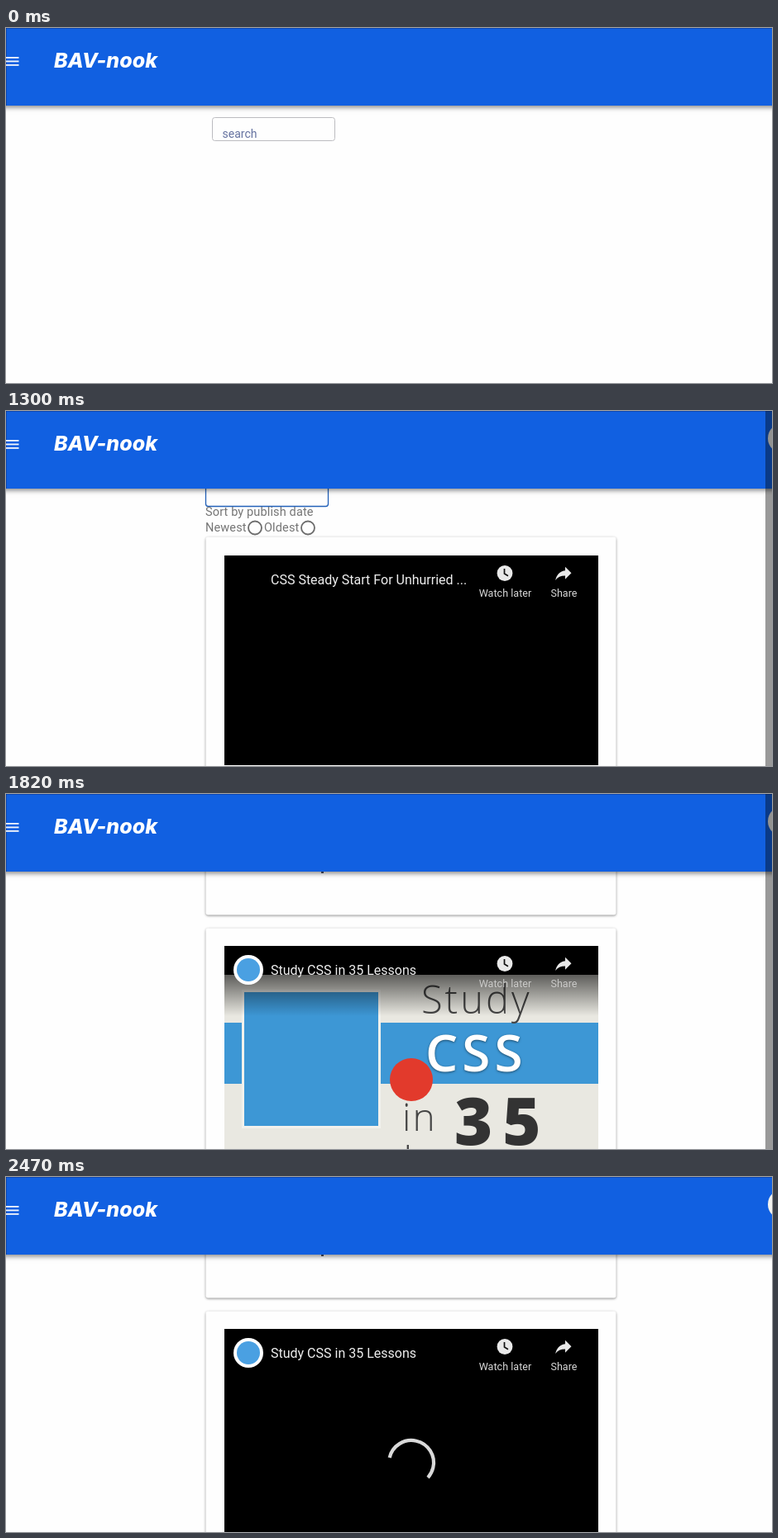
An HTML page with a canvas that plays this animation: 926x430 px, repeating every 2.6 s.

```html
<!DOCTYPE html>
<html lang="en">
<head>
<meta charset="utf-8">
<title>Video list</title>
<style>
  html, body { margin: 0; width: 100%; height: 100%; overflow: hidden; background: #fefefe; }
  canvas { display: block; }
</style>
</head>
<body>
<canvas id="stage" width="926" height="430"></canvas>
<script>
const ctx = document.getElementById('stage').getContext('2d');
const LOOP = 2600, STEP = 130;
const PAGE = '#fefefe', BLUE = '#1160e1', SKY = '#3d97d5';
const SHARE = new Path2D('M14 9V5l7 7-7 7v-4.1c-5 0-8.5 1.6-11 5.1 1-5 4-10 11-11z');

function rect(x, y, w, h, fill) {
  ctx.fillStyle = fill;
  ctx.fillRect(x, y, w, h);
}

function disc(x, y, r, fill) {
  ctx.fillStyle = fill;
  ctx.beginPath();
  ctx.arc(x, y, r, 0, 7);
  ctx.fill();
}

function ring(x, y, r, color, width, from = 0, to = Math.PI * 2) {
  ctx.strokeStyle = color;
  ctx.lineWidth = width;
  ctx.beginPath();
  ctx.arc(x, y, r, from, to);
  ctx.stroke();
}

function text(str, x, y, font, fill, spacing = 0, align = 'left') {
  ctx.font = font;
  ctx.letterSpacing = spacing + 'px';
  ctx.textAlign = align;
  ctx.fillStyle = fill;
  ctx.fillText(str, x, y);
}

const roboto = (size, weight = 400) => `${weight} ${size}px Roboto, sans-serif`;
const openSans = (size, weight) => `${weight} ${size}px "Open Sans", sans-serif`;
const mix = (a, b, p) => a + (b - a) * p;

function shadow(color, blur, dy) {
  ctx.shadowColor = color;
  ctx.shadowBlur = blur;
  ctx.shadowOffsetY = dy;
}

// focus: 0 = label inside the box, 1 = label on the border
function searchField(x, focus) {
  ctx.beginPath();
  ctx.roundRect(x + .5, 108.5, 148, 28, 3);
  ctx.strokeStyle = focus ? '#2260b8' : '#bcbcc0';
  ctx.lineWidth = focus ? 1.3 : 1;
  ctx.stroke();
  if (focus) rect(x + 9, 107, 42 * focus, 3, PAGE);
  text('search', x + 12.5, mix(132.5, 111, focus), roboto(mix(14, 11, focus)),
    focus ? '#2f57a8' : '#6572a0');
}

function sortOptions() {
  const label = (str, x, y) => text(str, x, y, roboto(14.5), '#757575', .136);
  label('Sort by publish date', 241, 148);
  label('Newest', 241, 167);
  label('Oldest', 312, 167);
  for (const x of [301, 365]) ring(x, 162.5, 8, '#6c6c6c', 1.8);
}

function card(y, height) {
  ctx.save();
  shadow('rgba(0,0,0,.45)', 3, 1);
  ctx.beginPath();
  ctx.roundRect(241.5, y, 496, height, 3);
  ctx.fillStyle = PAGE;
  ctx.fill();
  ctx.restore();
}

function thumbnail(y) {
  rect(264, y + 35, 452, 219, '#e9e8e1');
  rect(264, y + 93, 452, 74, SKY);
  rect(285, y + 53, 168, 168, '#f2f1ec');
  rect(288, y + 56, 162, 162, SKY);
  text('Study', 502, y + 82, openSans(47, 300), '#444', 3);
  ctx.save();
  shadow('rgba(0,0,0,.5)', 3, 1);
  text('CSS', 507, y + 152, openSans(62, 600), '#fff', 5);
  ctx.restore();
  text('in', 479, y + 224, openSans(46, 300), '#444', 2);
  text('35', 542, y + 241, openSans(79, 800), '#333', 12);
  text('Lessons', 480, y + 274, openSans(46, 300), '#444', 2);
  const fade = ctx.createLinearGradient(0, y + 35, 0, y + 85);
  fade.addColorStop(0, 'rgba(0,0,0,.6)');
  fade.addColorStop(1, 'rgba(0,0,0,0)');
  rect(264, y + 35, 452, 50, fade);
}

function player(y, title, { channel, thumb, spin }) {
  rect(264, y, 452, 254, '#000');
  if (thumb) thumbnail(y);
  if (channel) {
    disc(293, y + 29, 18, '#fff');
    disc(293, y + 29, 14, '#4aa0e2');
  }
  text(title, 320, y + 35, roboto(16), '#eee');

  disc(603, y + 21.5, 9.4, '#e9e9e9');
  ctx.strokeStyle = '#111';
  ctx.lineWidth = 1.7;
  ctx.stroke(new Path2D(`M602.5 ${y + 16}v6l4.5 2.7`));
  ctx.save();
  ctx.translate(661, y + 8.5);
  ctx.scale(1.07, 1.07);
  ctx.fillStyle = '#e9e9e9';
  ctx.fill(SHARE);
  ctx.restore();
  const tone = thumb ? 'rgba(255,255,255,.6)' : '#d8d8d8';
  text('Watch later', 603.5, y + 50, roboto(12.5), tone, .05, 'center');
  text('Share', 674.5, y + 50, roboto(12.5), tone, .05, 'center');

  if (thumb) disc(490, y + 162, 26, '#e23a2c');
  if (spin !== undefined) {
    const start = mix(0, 193, spin), length = mix(245, 209, spin), rad = Math.PI / 180;
    ring(490, y + 162, 27, '#d9d9d9', 4.2, start * rad, (start + length) * rad);
  }
}

function header(loaded) {
  ctx.save();
  shadow('rgba(0,0,0,.5)', 6, 2);
  rect(-10, -10, 946, 104, BLUE);
  ctx.restore();
  rect(0, 0, 926, 1, 'rgba(0,0,40,.25)');
  rect(0, 0, 1, 94, 'rgba(0,0,40,.25)');
  for (const y of [35, 39.5, 44]) rect(0, y, 15.5, 1.8, '#f4f6fc');
  text('BAV-nook', 58, 48, 'italic 800 25px Inter, sans-serif', '#fff');
  if (loaded) disc(939, 33, 18, '#f3f3f0');
}

function draw(time) {
  const step = Math.floor(time % LOOP / STEP);
  const loaded = step >= 4;
  const scroll = step < 10 ? 0 : step < 12 ? 21 : 390;

  rect(0, 0, 926, 430, PAGE);
  ctx.save();
  ctx.translate(0, -scroll);
  searchField(loaded ? 241 : 249, Math.min(1, step * .6));
  if (loaded) {
    sortOptions();
    card(173.5, 363);
    card(552.5, 363);
    if (step >= 10 && step < 12) player(196, 'CSS Steady Start For Unhurried ...', {});
    if (step >= 12) rect(381, 484, 3, 2, '#4a4f68');
    if (step >= 14) {
      player(574, 'Study CSS in 35 Lessons', {
        channel: true,
        thumb: step < 16,
        spin: step < 16 ? undefined : (step - 16) / 3
      });
    }
  }
  ctx.restore();

  header(loaded);
  if (loaded) {
    const bar = Math.max(0, Math.min(1, (step - 3) / 3, (19 - step) / 2));
    rect(918, 0, 8, 430, `rgba(0,0,0,${.4 * bar})`);
  }
}

function tick() {
  draw(performance.now());
  requestAnimationFrame(tick);
}
tick();
</script>
</body>
</html>
```
